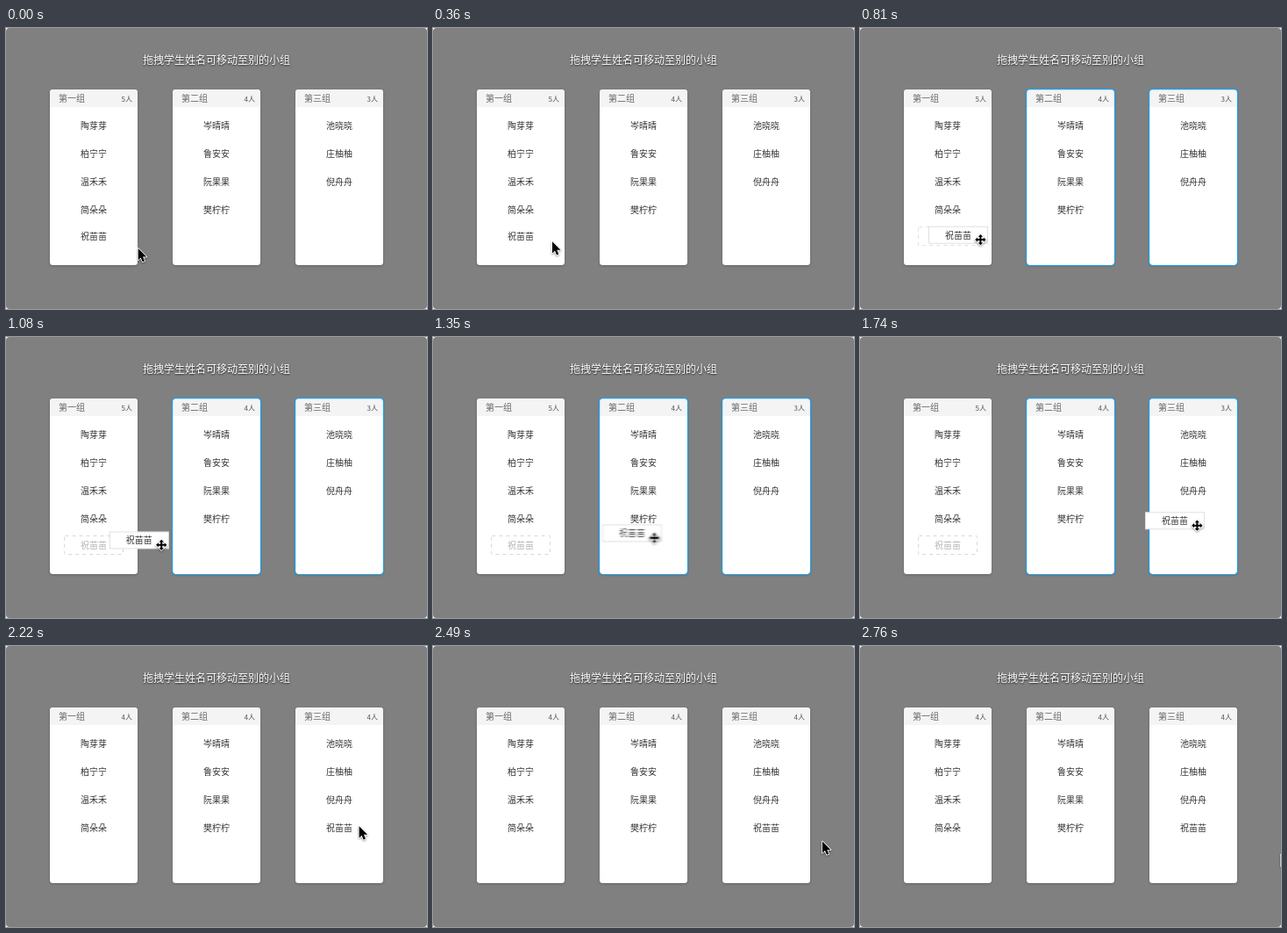
Recreate the animation shown at these times as an HTML page. Size 480 by 320 pixels, loop 3 s.

```html
<!DOCTYPE html>
<html lang="zh-CN">
<head>
<meta charset="utf-8">
<title>拖拽分组</title>
<style>
  html, body { margin: 0; width: 100%; height: 100%; overflow: hidden; background: #fff; }
  svg { display: block; width: 480px; height: 320px; }
  text { font-family: "Noto Sans CJK SC", "Noto Sans CJK", "Noto Sans", sans-serif; font-size: 10px; fill: #333; text-anchor: middle; }
  .title { font-size: 12px; fill: #fff; text-shadow: 0 1px 2px rgba(0, 0, 0, .75); }
  .head { fill: #666; text-anchor: start; }
  .count { font-size: 8px; fill: #555; text-anchor: end; }
  .card { filter: drop-shadow(0 1px 1.5px rgba(0, 0, 0, .2)); }
  .edge { fill: none; stroke: #18a0ea; stroke-width: 1.2; }
  .pointer { fill: #000; stroke: #fff; stroke-width: 1.6; paint-order: stroke; stroke-linejoin: round;
    filter: drop-shadow(0 1px 1.2px rgba(0, 0, 0, .4)); }
</style>
</head>
<body>
<svg viewBox="0 0 480 320">
  <defs>
    <filter id="motionBlur" filterUnits="userSpaceOnUse" x="0" y="0" width="480" height="320">
      <feGaussianBlur id="blur" stdDeviation="0 0"/>
    </filter>
  </defs>
  <rect width="480" height="320" rx="4" fill="#808080"/>
  <text class="title" x="240" y="41">拖拽学生姓名可移动至别的小组</text>
  <g id="cards"></g>
  <g id="ghost">
    <rect x="66.5" y="226.5" width="67" height="21" rx="1" fill="none" stroke="#d8d8d8" stroke-dasharray="4 4"/>
    <text class="pupil" x="100" y="241" style="fill:#b4b4b4"></text>
  </g>
  <text id="resting" class="pupil" y="241"></text>
  <g id="mover">
    <g id="drag">
      <rect x="66.5" y="227.5" width="67" height="19" fill="#fff" stroke="#e0e0e0"/>
      <text class="pupil" x="100" y="241"></text>
    </g>
    <path id="arrow" class="pointer" d="M0 0V13.2L3 10.4L5 15.2L7.3 14.2L5.3 9.6H9.5Z"/>
    <path id="cross" class="pointer" d="M0-6.2L2.7-3.4H1V-1H3.4V-2.7L6.2 0L3.4 2.7V1H1V3.4H2.7L0 6.2L-2.7 3.4H-1V1H-3.4V2.7L-6.2 0L-3.4-2.7V-1H-1V-3.4H-2.7Z"/>
  </g>
</svg>
<script>
const LOOP = 3000, STEP = 30;
const PRESS = 540, DROP = 1890, RECOUNT = 2220;
const pupil = '祝苗苗';
const groups = [
  ['第一组', '陶芽芽', '柏宁宁', '温禾禾', '简朵朵'],
  ['第二组', '岑晴晴', '鲁安安', '阮果果', '樊柠柠'],
  ['第三组', '池晓晓', '庄柚柚', '倪舟舟']
];
const $ = id => document.getElementById(id);

$('cards').innerHTML = groups.map(([title, ...names], i) => {
  const x = 50 + i * 140;
  const edge = i ? `<rect class="edge" x="${x - .4}" y="69.6" width="100.9" height="200.9" rx="4"/>` : '';
  const list = names.map((name, k) => `<text x="${x + 50}" y="${115.2 + k * 32}">${name}</text>`).join('');
  return `<rect class="card" x="${x}" y="70" width="100" height="200" rx="3.5" fill="#fff"/>
    <path d="M${x} 90V73.5q0-3.5 3.5-3.5h93q3.5 0 3.5 3.5V90Z" fill="#f4f4f4"/>
    <text class="head" x="${x + 10}" y="84.2">${title}</text>
    <text class="count" x="${x + 94}" y="83.6"></text>${list}${edge}`;
}).join('');
document.querySelectorAll('.pupil').forEach(el => el.textContent = pupil);
const counts = document.querySelectorAll('.count');
const edges = document.querySelectorAll('.edge');

const clamp = v => Math.min(1, Math.max(0, v));
const ramp = (t, from, to) => clamp((t - from) / (to - from));
const smooth = u => u * u * (3 - 2 * u);

// Smooth curve through [time, value] points, at rest at both ends.
function track(points, t) {
  const last = points.length - 1;
  if (t <= points[0][0]) return points[0][1];
  if (t >= points[last][0]) return points[last][1];
  const slope = k => k === 0 || k === last ? 0 :
    (points[k + 1][1] - points[k - 1][1]) / (points[k + 1][0] - points[k - 1][0]);
  const k = points.findIndex(p => p[0] > t) - 1;
  const [t0, a] = points[k], [t1, b] = points[k + 1];
  const h = t1 - t0, u = (t - t0) / h, e = smooth(u);
  return a + (b - a) * e + h * u * (1 - u) * ((1 - u) * slope(k) - u * slope(k + 1));
}

const enterX = [[30, 150.7], [360, 136], [540, 122]];
const dragX = [[570, 0], [810, 12], [1110, 58], [1350, 127], [1650, 235], [1740, 259], [DROP, 280]];

function pointerAt(t) {
  if (t < PRESS) {
    const x = track(enterX, t);
    return [x, 251 - (150.7 - x) * .53];
  }
  if (t < DROP) {
    const dx = track(dragX, t);
    return [dx, -dx * 30 / 280];
  }
  const u = smooth(ramp(t, 2190, 2760));
  return [402 + 77.8 * u, 205 + 32.5 * u];
}

const place = (el, x, y) => el.setAttribute('transform', `translate(${x.toFixed(2)} ${y.toFixed(2)})`);
const show = (el, on) => el.style.display = on ? '' : 'none';

function draw(t) {
  const dragging = t >= PRESS && t < DROP;
  const [x, y] = pointerAt(t);

  show($('drag'), dragging);
  show($('cross'), dragging);
  show($('arrow'), !dragging);
  show($('ghost'), dragging);
  show($('resting'), !dragging);
  if (dragging) {
    place($('drag'), x, y);
    place($('cross'), 125.4 + x, 242.4 + y);
  } else {
    place($('arrow'), x, y);
    $('resting').setAttribute('x', t < PRESS ? 100 : 380);
    $('resting').setAttribute('y', t < PRESS ? 241 : 211.2);
  }
  $('ghost').style.opacity = .5 + .5 * ramp(t, PRESS, 1050);

  const glow = ramp(t, 510, 570) * (1 - ramp(t, 1860, 1950));
  edges.forEach(el => el.style.opacity = glow);

  const moved = t >= RECOUNT;
  [moved ? 4 : 5, 4, moved ? 4 : 3].forEach((n, i) => counts[i].textContent = n + '人');

  const end = t < PRESS ? Math.min(t + 7, PRESS - 1) : dragging ? Math.min(t + 7, DROP - 1) : t + 7;
  const sigma = Math.abs(pointerAt(end)[0] - x) / 7 * 3.4;
  $('blur').setAttribute('stdDeviation', `${sigma.toFixed(2)} ${(sigma * .12).toFixed(2)}`);
  if (sigma > .15) $('mover').setAttribute('filter', 'url(#motionBlur)');
  else $('mover').removeAttribute('filter');
}

const start = performance.now();
function frame() {
  const t = (performance.now() - start) % LOOP;
  draw(Math.floor(t / STEP) * STEP);
  requestAnimationFrame(frame);
}
frame();
</script>
</body>
</html>
```
